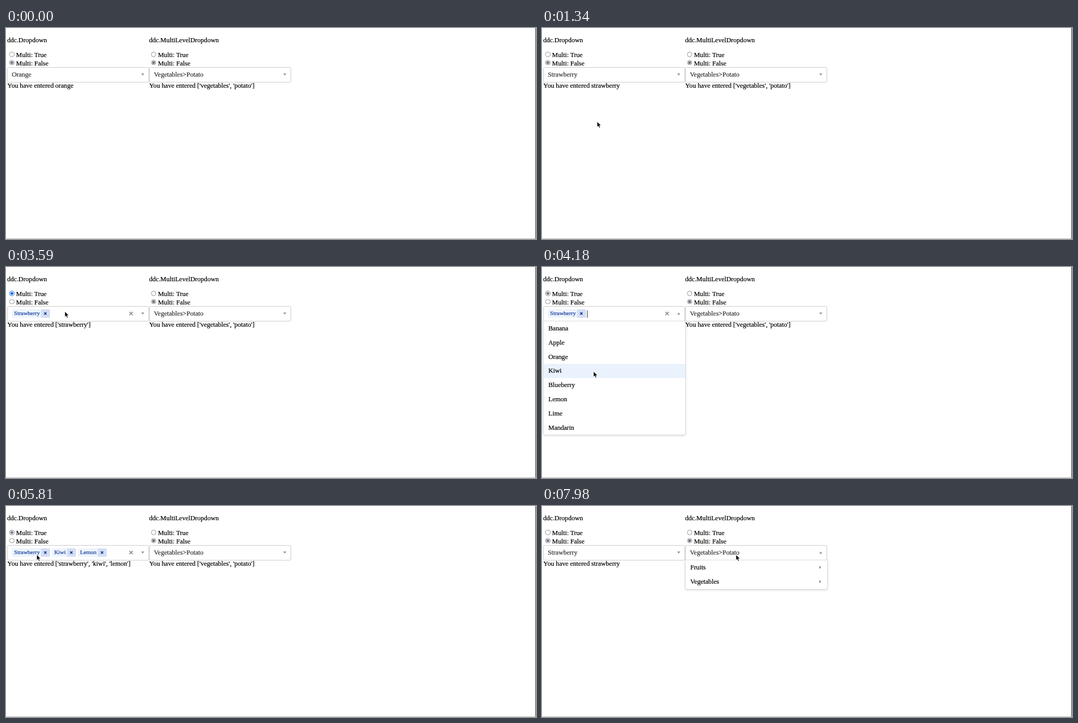
An HTML page for the animation above (8 s loop, 1000 by 399 pixels).

```html
<!DOCTYPE html>
<html lang="en">
<head>
<meta charset="utf-8">
<title>Dropdown demo</title>
<style>
html, body { margin: 0; width: 100%; height: 100%; overflow: hidden; background: #fff; }
#stage { position: relative; width: 1000px; height: 399px; overflow: hidden; background: #fff;
  font: 12.57px/16px "Liberation Serif", "Times New Roman", serif; color: #000; -webkit-text-stroke: .22px; }
#stage * { box-sizing: border-box; }
.edge-r { position: absolute; left: 999px; top: 0; width: 1px; height: 399px; background: #2a2a2a; }
.edge-b { position: absolute; left: 0; top: 398px; width: 1000px; height: 1px; background: #b4b4b4; }
.col { position: absolute; top: 0; width: 268px; height: 399px; }
.text { position: absolute; white-space: pre; }
.radio { position: absolute; left: 4px; width: 9.4px; height: 9.4px; border-radius: 50%; border: 1px solid #8a8a8a; --c: #72767f; }
.radio.on { border-color: var(--c); background: radial-gradient(circle, var(--c) 2.3px, #fff 3px); }
.select { position: absolute; left: 0; top: 74px; width: 268px; height: 28.5px; border: 1px solid #ccc; border-radius: 3px; background: #fff; }
.value { color: #333; }
.arrow { position: absolute; left: 252.5px; top: 86.3px; border: 3.5px solid transparent; border-top: 4px solid #999; border-bottom: 0; }
.arrow.up { border-top: 0; border-bottom: 4px solid #999; }
.next { position: absolute; right: 10.5px; top: 9.9px; border: 3.5px solid transparent; border-left: 4px solid #999; border-right: 0; }
.clear { position: absolute; left: 229.8px; top: 84.3px; width: 8px; height: 8px; stroke: #8c8c8c; stroke-width: 1.7; }
.chips { position: absolute; left: 9px; top: 80.4px; display: flex; gap: 4px; font-size: 10.95px; line-height: 15px; color: #15399a; }
.chip { display: flex; background: #edf4fd; border-radius: 2px; padding-left: 4px; height: 15.4px; }
.chip svg { width: 16.5px; height: 15.4px; margin-left: 2.5px; background: #d4dff5; border-radius: 0 2px 2px 0; stroke: #15328c; stroke-width: 1.6; }
.caret { position: absolute; top: 81.5px; width: 1px; height: 14px; background: #333; }
.menu { position: absolute; left: 0; top: 102px; width: 268.5px; background: #fff; border: 1px solid #dcdcdc; border-top-color: #e6e6e6;
  border-radius: 0 0 4px 4px; box-shadow: 0 1px 4px rgba(0,0,0,.16); overflow: hidden; }
.row { position: relative; height: 26.8px; line-height: 26.8px; padding-left: 8.7px; }
.row.focus { background: #deebfd; }
.row.hover { background: #eaf2fd; }
#cursor { position: absolute; left: -1px; top: -1px; width: 11px; height: 16px; }
</style>
</head>
<body>
<div id="stage">
  <div class="col" id="left" style="left:2.3px"></div>
  <div class="col" id="right" style="left:270px"></div>
  <div class="edge-r"></div>
  <div class="edge-b"></div>
  <svg id="cursor" viewBox="-1 -1 11 16"><path d="M0 0V10.6L2.4 8.4 4.1 12.2 6 11.4 4.3 7.7H7.6Z" fill="#000" stroke="#fff" stroke-width=".8"/></svg>
</div>
<script>
const LOOP = 8000;
const ROW = 26.8;
const MENU_TOP = 102.5;
const FRUITS = ['Banana', 'Apple', 'Orange', 'Strawberry', 'Kiwi', 'Blueberry', 'Lemon', 'Lime', 'Mandarin'];
const BLUE = '#0b66e0';

// Each step overrides what went before it.
const steps = [
  [0, { multi: false, picked: ['Orange'], open: false, tint: '', levels: false }],
  [790, { open: true }],
  [1340, { picked: ['Strawberry'], open: false }],
  [2960, { multi: true, tint: BLUE }],
  [3660, { open: true, tint: '' }],
  [4360, { picked: ['Strawberry', 'Kiwi'] }],
  [5080, { picked: ['Strawberry', 'Kiwi', 'Lemon'] }],
  [5460, { open: false }],
  [6300, { multi: false, picked: ['Strawberry'], tint: BLUE }],
  [7800, { levels: true, tint: '' }]
];

// Pointer: time, x, y.
const path = [
  [90, 440, 300], [700, 110, 92], [960, 107, 92], [1020, 107, 97], [1190, 104, 176],
  [1530, 104, 178], [1800, 108, 150], [2040, 113, 120], [2260, 125, 89], [2340, 126, 88], [2450, 131, 89],
  [2640, 131, 89], [2880, 11, 51], [3080, 11, 51], [3390, 111, 84],
  [3700, 111, 84], [4020, 98, 197], [4400, 96, 198], [4730, 91, 227],
  [5180, 91, 226], [5430, 345, 235], [5500, 345, 235], [5810, 58, 92],
  [6010, 58, 92], [6130, 12, 66], [6770, 12, 66], [7130, 278, 108], [7340, 284, 98], [7610, 366, 92]
];

const cross = (cls, box, c, r) =>
  `<svg class="${cls}" viewBox="${box}"><path d="M${c[0] - r} ${c[1] - r}l${2 * r} ${2 * r}m0 ${-2 * r}l${-2 * r} ${2 * r}"/></svg>`;
const text = (x, y, s, cls = '') => `<div class="text ${cls}" style="left:${x}px;top:${y - 8}px">${s}</div>`;
const radio = (y, on, tint) =>
  `<div class="radio ${on ? 'on' : ''}" style="top:${y - 4.7}px;${tint ? '--c:' + tint : ''}"></div>`;
const caret = x => `<div class="caret" style="left:${x}px"></div>`;
const chip = s => `<div class="chip">${s}${cross('', '0 0 16.5 15.4', [8.2, 8], 2.2)}</div>`;
const arrow = up => `<div class="arrow ${up ? 'up' : ''}"></div>`;

function head(title, multi, tint) {
  return text(0, 23, title) +
    radio(49.9, multi, tint) + text(16.7, 51, 'Multi: True') +
    radio(65.7, !multi, tint) + text(16.7, 66.7, 'Multi: False') +
    '<div class="select"></div>';
}

function menu(s, focus, hovering) {
  const rows = FRUITS.filter(f => !s.picked.includes(f)).map((f, i) =>
    `<div class="row ${i === focus ? (hovering ? 'hover' : 'focus') : ''}">${f}</div>`);
  return `<div class="menu">${rows.join('')}</div>`;
}

function leftHtml(s, focus, hovering) {
  const names = s.picked.map(p => p.toLowerCase());
  const entered = s.multi ? `[${names.map(n => `'${n}'`).join(', ')}]` : names[0];
  let html = head('ddc.Dropdown', s.multi, s.tint) + text(0.3, 109, 'You have entered ' + entered);
  if (s.multi) {
    html += `<div class="chips">${s.picked.map(chip).join('')}</div>` + cross('clear', '0 0 8 8', [4, 4], 3.1);
  } else {
    html += text(8.6, 88, s.picked[0], 'value');
  }
  if (s.open) html += caret(s.multi ? [0, 83, 132, 190][s.picked.length] : 7) + menu(s, focus, hovering);
  return html + arrow(s.open);
}

function rightHtml(s) {
  let html = head('ddc.MultiLevelDropdown', false, '') +
    text(8.9, 88, 'Vegetables&gt;Potato', 'value') + arrow(s.levels) +
    text(0.3, 109, "You have entered ['vegetables', 'potato']");
  if (s.levels) {
    html += '<div class="menu">' +
      ['Fruits', 'Vegetables'].map(v => `<div class="row">${v}<i class="next"></i></div>`).join('') + '</div>';
  }
  return html;
}

function stateAt(t) {
  return Object.assign({}, ...steps.filter(s => s[0] <= t).map(s => s[1]));
}

function pointerAt(t) {
  const i = path.findIndex(p => p[0] > t);
  if (i === 0) return null;
  if (i < 0) return path[path.length - 1].slice(1);
  const [t0, x0, y0] = path[i - 1], [t1, x1, y1] = path[i];
  const k = (t - t0) / (t1 - t0);
  return [x0 + (x1 - x0) * k, y0 + (y1 - y0) * k];
}

const byId = id => document.getElementById(id);
const cursor = byId('cursor');
const shown = {};

function put(id, html) {
  if (shown[id] !== html) byId(id).innerHTML = shown[id] = html;
}

function draw(t) {
  const s = stateAt(t), p = pointerAt(t);
  const count = FRUITS.length - s.picked.length;
  let row = p ? Math.floor((p[1] - MENU_TOP) / ROW) : -1;
  const hovering = row >= 0 && row < count && p[0] < 270;
  if (!hovering) row = row < 0 ? 0 : 4;
  put('left', leftHtml(s, row, hovering));
  put('right', rightHtml(s));
  cursor.style.display = p ? '' : 'none';
  if (p) cursor.style.transform = `translate(${p[0]}px, ${p[1]}px)`;
}

const start = performance.now();
function tick() {
  draw((performance.now() - start) % LOOP);
  requestAnimationFrame(tick);
}
tick();
</script>
</body>
</html>
```
